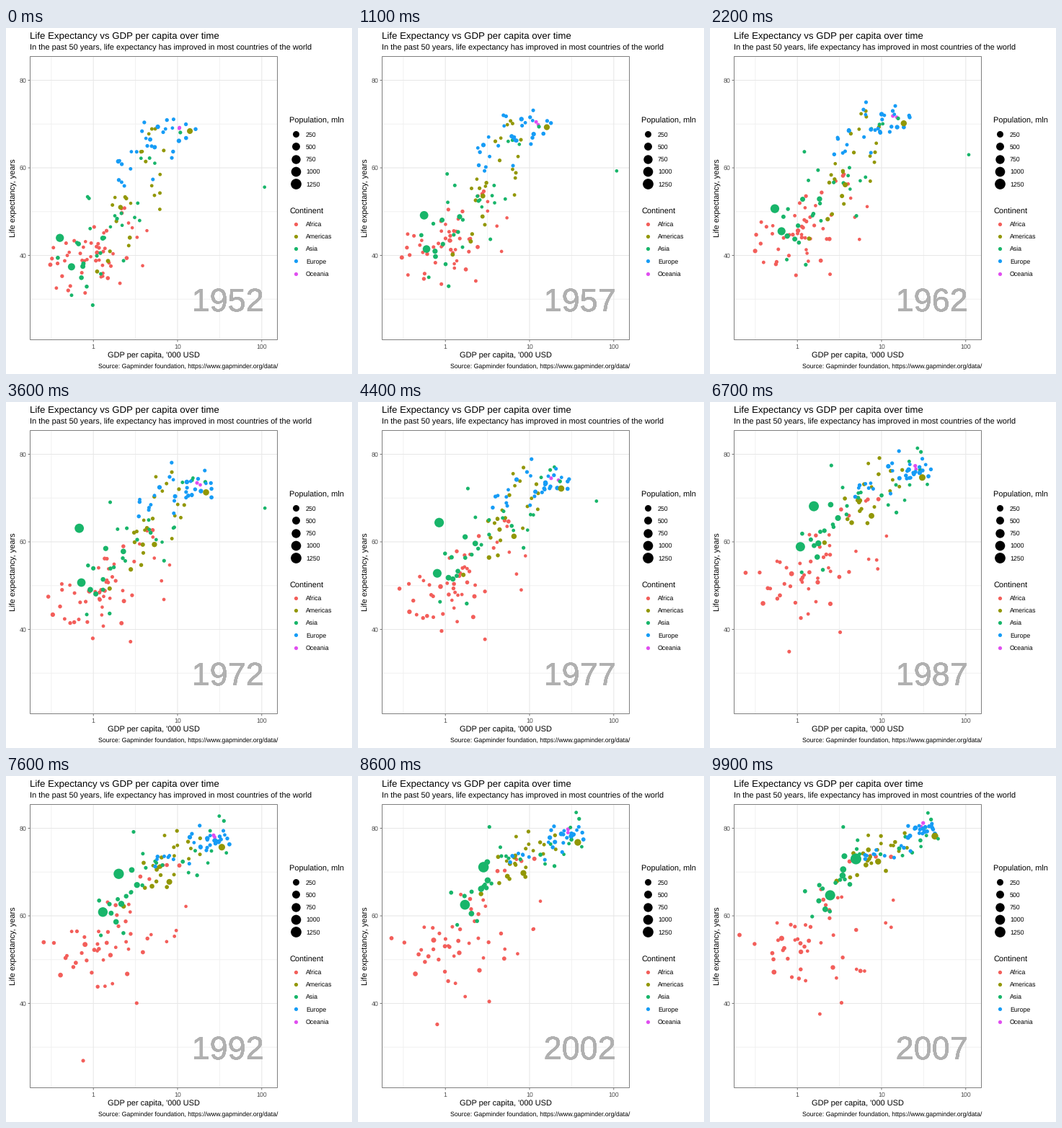
A matplotlib script for the animation above (10000 ms loop, 480 by 480 pixels).

```python
import numpy as np
import matplotlib.pyplot as plt
from matplotlib import patheffects
from matplotlib.animation import FuncAnimation

plt.rcParams["font.family"] = "Liberation Sans"
plt.rcParams["text.hinting"] = "none"
plt.rcParams["path.snap"] = False

SIZE, FRAMES, STEP = 480, 100, 9
YEARS = np.arange(1952, 2008, 5)
T = np.linspace(0, 1, len(YEARS))
COLORS = {
    "Africa": "#f35e5a",
    "Americas": "#929705",
    "Asia": "#18b56a",
    "Europe": "#169cf6",
    "Oceania": "#e04ef0",
}
LEFT, RIGHT, TOP, BOTTOM = 33.5, 376.5, 39.5, 432.5
rng = np.random.default_rng(12)


def to_x(log_gdp):
    return 121.2 + 116.8 * log_gdp


def to_y(life):
    return 72.5 + (80 - life) * 6.075


def radius(pop):
    size = 1 + 5 * np.sqrt(pop / 1319)
    return 0.375 * (2.845 * size + 0.94) + 0.75


def area(r):
    return (2 * r) ** 2


# Each entry: log GDP, life expectancy and population over YEARS
paths, colors = [], []


def add(continent, log_gdp, life, pop):
    paths.append((log_gdp, life, pop))
    colors.append(COLORS[continent])


def track(continent, pop, *points):
    """A country through a few (year, GDP in thousands, life) points."""
    year, gdp, life = zip(*points)
    add(continent, np.interp(YEARS, year, np.log10(gdp)),
        np.interp(YEARS, year, life), np.linspace(*pop, len(YEARS)))


def between(ends, power=1.0):
    """From start to end, slowing down when power exceeds 1."""
    start, end = ends
    return start + (end - start) * (1 - (1 - T) ** power)


def wander(n):
    """Standard scores of n countries that drift slowly over time."""
    z = rng.normal(size=(2, n))
    z = (z - z.mean(axis=1, keepdims=True)) / z.std(axis=1, keepdims=True)
    z = np.clip(z, -2, 2)
    return np.outer(z[0], np.cos(0.9 * T)) + np.outer(z[1], np.sin(0.9 * T))


def cloud(continent, n, pop, gdp, gdp_sd, life, life_sd,
          growth=2.6, power=1.6, bulge=0):
    """Countries around a mean path of GDP in thousands and life."""
    mean_gdp = between(np.log10(gdp), 1.6)
    mean_life = between(life, power) + bulge * np.sin(np.pi * T)
    zx = wander(n)
    zy = 0.45 * zx + 0.89 * wander(n)
    for x, y in zip(zx, zy):
        start = np.clip(pop * np.exp(rng.normal()), 0.3, 80)
        add(continent,
            mean_gdp + between(gdp_sd) * x + rng.normal(0, 0.02, len(T)),
            mean_life + between(life_sd) * y + rng.normal(0, 0.3, len(T)),
            start * between((1, growth)))


cloud("Oceania", 2, 5, (10.3, 29.5), (0.01, 0.07), (69.2, 80.7), (0.2, 0.5),
      power=1)
# Africa: sub-Saharan, northern, southern, oil exporters
cloud("Africa", 36, 4, (0.85, 1.15), (0.23, 0.27), (39, 55), (4.3, 5))
cloud("Africa", 5, 6, (2, 6.9), (0.1, 0.15), (46.5, 73), (4, 1.8))
cloud("Africa", 6, 2, (1, 4), (0.3, 0.25), (43, 46), (4, 4), bulge=10)
cloud("Africa", 4, 1, (3.3, 9), (0.12, 0.18), (40, 55), (4, 6))
cloud("Americas", 23, 5, (3.2, 8.3), (0.23, 0.23), (54, 74), (8, 3.4))
# Asia: developing, populous, newly rich
cloud("Asia", 14, 8, (1.1, 3), (0.25, 0.25), (42, 69.5), (7.5, 5))
cloud("Asia", 4, 45, (0.8, 2.6), (0.1, 0.15), (40, 67), (3, 3))
cloud("Asia", 11, 5, (2.8, 24), (0.28, 0.18), (53, 77.5), (7.5, 3))
# Europe: east, west
cloud("Europe", 13, 8, (3.2, 12), (0.22, 0.2), (61, 75), (4, 1.5),
      growth=1.2, power=2.4)
cloud("Europe", 17, 11, (6.8, 32), (0.18, 0.09), (67.6, 79.8), (2.6, 0.8),
      growth=1.25, power=1.1)

# Countries that stand out by size or by path
track("Africa", (2.5, 9), (1952, 0.49, 40), (1987, 0.85, 44),
      (1992, 0.74, 23.6), (2007, 0.86, 46))
track("Americas", (57, 190), (1952, 2.1, 51), (1977, 6.7, 61.5),
      (2007, 9.1, 72.4))
track("Americas", (158, 301), (1952, 14, 68.4), (1972, 21.8, 71.3),
      (2007, 43, 78.2))
track("Asia", (1, 2.5), (1952, 108, 55.6), (1972, 109, 67.7),
      (1982, 31, 71.3), (2007, 47, 77.6))
track("Asia", (82, 224), (1952, 0.75, 37.5), (1967, 0.76, 46),
      (2007, 3.5, 70.6))
track("Asia", (372, 1110), (1952, 0.55, 37.4), (1972, 0.72, 50.7),
      (1992, 1.16, 60.2), (2007, 2.45, 64.7))
track("Asia", (556, 1319), (1952, 0.4, 44), (1957, 0.58, 50.5),
      (1962, 0.49, 44.5), (1967, 0.61, 58.4), (1972, 0.68, 63.1),
      (1997, 2.29, 70.4), (2007, 4.96, 73))

# Axes: state, quantity (x, y, population), country
states = np.array(paths).transpose(2, 1, 0)

fig = plt.figure(figsize=(SIZE / 72, SIZE / 72), dpi=72, facecolor="white")
ax = fig.add_axes([0, 0, 1, 1])
ax.set_xlim(0, SIZE)
ax.set_ylim(SIZE, 0)
ax.axis("off")


def line(x0, y0, x1, y1, color, width=1):
    ax.plot([x0, x1], [y0, y1], color=color, lw=width, zorder=1,
            solid_capstyle="butt")


def text(x, y, label, size, color="black", **kw):
    return ax.text(x, y, label, fontsize=size, color=color,
                   **{"va": "baseline", **kw})


for power in (-0.5, 0.5, 1.5):
    line(to_x(power), TOP, to_x(power), BOTTOM, "#f1f1f1")
for life in (30, 50, 70):
    line(LEFT, to_y(life), RIGHT, to_y(life), "#f1f1f1")
for power, label in enumerate(("1", "10", "100")):
    x = to_x(power)
    line(x, TOP, x, BOTTOM, "#e7e7e7")
    line(x, BOTTOM, x, BOTTOM + 3, "#555555", 0.8)
    text(x, 445, label, 8.8, "#4d4d4d", ha="center")
for life in (40, 60, 80):
    y = to_y(life)
    line(LEFT, y, RIGHT, y, "#e7e7e7")
    line(LEFT - 3, y, LEFT, y, "#555555", 0.8)
    text(28.5, y + 3.2, str(life), 8.8, "#4d4d4d", ha="right")
ax.add_patch(plt.Rectangle((LEFT, TOP), RIGHT - LEFT, BOTTOM - TOP,
                           fill=False, ec="#7f7f7f", lw=1, zorder=4,
                           snap=False))

text(33, 15, "Life Expectancy vs GDP per capita over time", 13.2)
text(33, 31, "In the past 50 years, life expectancy has improved "
     "in most countries of the world", 11)
text(205, 458, "GDP per capita, '000 USD", 11, ha="center")
text(16.5, 236, "Life expectancy, years", 11, rotation=90,
     ha="right", va="center")
text(377, 472, "Source: Gapminder foundation, "
     "https://www.gapminder.org/data/", 8.8, ha="right")

text(393, 132, "Population, mln", 11)
for i, pop in enumerate(range(250, 1251, 250)):
    y = 147.2 + 17.28 * i
    ax.scatter(402, y, s=area(radius(pop)), c="black", lw=0, snap=False)
    text(416, y + 3.3, str(pop), 8.8)
text(393, 257.5, "Continent", 11)
for i, (name, color) in enumerate(COLORS.items()):
    y = 271.5 + 17.28 * i
    ax.scatter(402, y, s=area(2.6), c=color, lw=0, snap=False)
    text(416, y + 3.3, name, 8.8)

dots = ax.scatter(*states[0, :2], c=colors, lw=0, zorder=3)
# Repeated painting hardens the edges of the big year
year_text = text(307.7, 393, "1952", 45, "#b0b0b0", ha="center", zorder=2,
                 path_effects=[patheffects.Normal()] * 12)


def update(frame):
    k, rest = divmod(frame, STEP)
    mix = rest / STEP
    after = states[min(k + 1, len(YEARS) - 1)]
    log_gdp, life, pop = states[k] * (1 - mix) + after * mix
    dots.set_offsets(np.column_stack([to_x(log_gdp), to_y(life)]))
    dots.set_sizes(area(radius(pop)))
    year_text.set_text(str(YEARS[round(frame / STEP)]))
    return dots, year_text


anim = FuncAnimation(fig, update, frames=FRAMES, interval=100,
                     repeat=True, repeat_delay=0)
plt.show()
```
